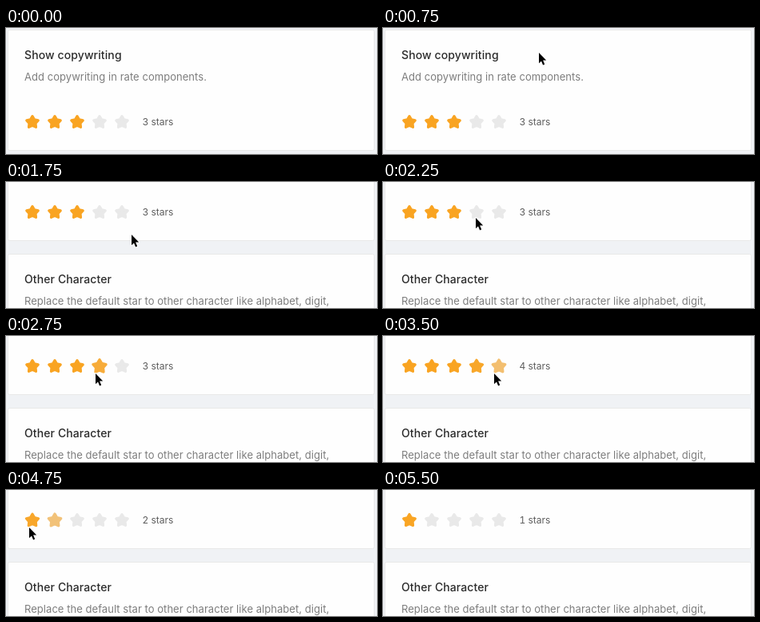
Animation, 464 px wide and 158 px high, one loop 6000 ms. Source, as an HTML page:

```html
<!DOCTYPE html>
<html lang="en">
<head>
<meta charset="utf-8">
<title>Rate with copywriting</title>
<style>
  html, body { margin: 0; width: 100%; height: 100%; overflow: hidden; background: #f0f2f5; }
  svg { display: block; width: 464px; height: 158px; font-family: Inter, "Open Sans", sans-serif; }
  .card { fill: #fefefe; stroke: #e8e8e8; }
  .title { font-size: 14px; font-weight: 500; letter-spacing: .1px; fill: #2b2b2b; }
  .desc { font-size: 13px; letter-spacing: .045px; fill: #7d7d7d; }
  .count { font-size: 12px; font-variant-numeric: tabular-nums; fill: #5c5c5c; }
  .star { stroke-width: 3.2; stroke-linejoin: round; }
</style>
</head>
<body>
<svg viewBox="0 0 464 158">
  <g id="page">
    <rect class="card" x="2.5" y="2.5" width="458" height="151" rx="2"/>
    <text class="title" x="23" y="39">Show copywriting</text>
    <text class="desc" x="23" y="66">Add copywriting in rate components.</text>
    <g id="stars"></g>
    <text class="count" id="count" x="170.5" y="122"></text>
    <rect class="card" x="2.5" y="170.5" width="458" height="151" rx="2"/>
    <text class="title" x="23" y="207">Other Character</text>
    <text class="desc" x="23" y="234">Replace the default star to other character like alphabet, digit,</text>
  </g>
  <path id="cursor" d="M0 0V13.2L3 10.4L5.1 15.4L7.2 14.5L5.1 9.6H9.2Z"
        fill="#000" stroke="#fff" stroke-width="2" stroke-linejoin="round" paint-order="stroke"/>
</svg>
<script>
const LOOP = 6000, STEP = 250, FADE = 380;
const SCROLL_AT = 1750, SCROLL = 80, LEAVE_AT = 5150;
const EMPTY = [233, 233, 233], FULL = [249, 164, 34];
const $ = id => document.getElementById(id);

// The pointer enters each star in turn and may click it.
const visits = [
  { enter: 2350, star: 4, click: 3000 },
  { enter: 3250, star: 5, click: 3750 },
  { enter: 3850, star: 3 },
  { enter: 4110, star: 2, click: 4500 },
  { enter: 4600, star: 1, click: 5000 }
];
const approach = [
  [250, 209, 8], [500, 208, 9], [1000, 177, 50], [1250, 177, 50],
  [1500, 155, 65], [1750, 155, 65], [2000, 137, 71], [2250, 114, 44]
];
const rests = visits.flatMap(({ enter, star, click }) => {
  const arrive = Math.ceil(enter / STEP) * STEP;
  return [arrive, click || arrive].map(t => [t, 27.4 * star, 46]);
});
const path = [...approach, ...rests];

const hoverAt = t => t >= LEAVE_AT ? 0 : visits.filter(v => v.enter <= t).pop()?.star || 0;
const scoreAt = t => visits.filter(v => v.click <= t).pop()?.star || 3;
const litAt = t => hoverAt(t) || scoreAt(t);
const turns = [0, ...visits.map(v => v.enter), LEAVE_AT];

// Moves a 0..1 value toward its current goal, at a constant rate.
function follow(goal, t) {
  let value = goal(0);
  turns.forEach((from, i) => {
    const span = Math.max(0, Math.min(t, turns[i + 1] ?? LOOP) - from) / FADE;
    const gap = goal(from) - value;
    value += Math.sign(gap) * Math.min(Math.abs(gap), span);
  });
  return value;
}

function pointerAt(t) {
  if (t < path[0][0] || t >= LEAVE_AT) return null;
  const i = path.findIndex(p => p[0] > t);
  if (i < 0) return path[path.length - 1].slice(1);
  const [a, b] = [path[i - 1], path[i]];
  const k = (t - a[0]) / (b[0] - a[0]);
  return [1, 2].map(j => Math.round(a[j] + (b[j] - a[j]) * k));
}

const mix = k => `rgb(${EMPTY.map((c, i) => Math.round(c + (FULL[i] - c) * k))})`;

const points = Array.from({ length: 10 }, (_, i) => {
  const r = i % 2 ? 4.2 : 7.6, a = i * Math.PI / 5;
  return `${(r * Math.sin(a)).toFixed(2)},${(-r * Math.cos(a)).toFixed(2)}`;
}).join(" ");

const stars = [1, 2, 3, 4, 5].map(() => {
  const star = document.createElementNS("http://www.w3.org/2000/svg", "polygon");
  star.setAttribute("class", "star");
  star.setAttribute("points", points);
  return $("stars").appendChild(star);
});

function draw(ms) {
  const t = Math.floor(ms % LOOP / STEP) * STEP;
  $("page").setAttribute("transform", `translate(0 ${t < SCROLL_AT ? 0 : -SCROLL})`);
  stars.forEach((star, i) => {
    const grow = follow(u => +(hoverAt(u) === i + 1), t);
    const level = follow(u => +(litAt(u) > i), t);
    const color = mix(level * (1 - .12 * grow));
    star.setAttribute("transform", `translate(${33 + 28 * i} 118.2) scale(${1 + .1 * grow})`);
    star.setAttribute("fill", color);
    star.setAttribute("stroke", color);
  });
  $("count").textContent = `${scoreAt(t)} stars`;
  const spot = pointerAt(t);
  $("cursor").style.display = spot ? "" : "none";
  if (spot) $("cursor").setAttribute("transform", `translate(${spot[0] + 2} ${spot[1] + 1})`);
}

const start = performance.now();
function tick() {
  draw(performance.now() - start);
  requestAnimationFrame(tick);
}
tick();
</script>
</body>
</html>
```
